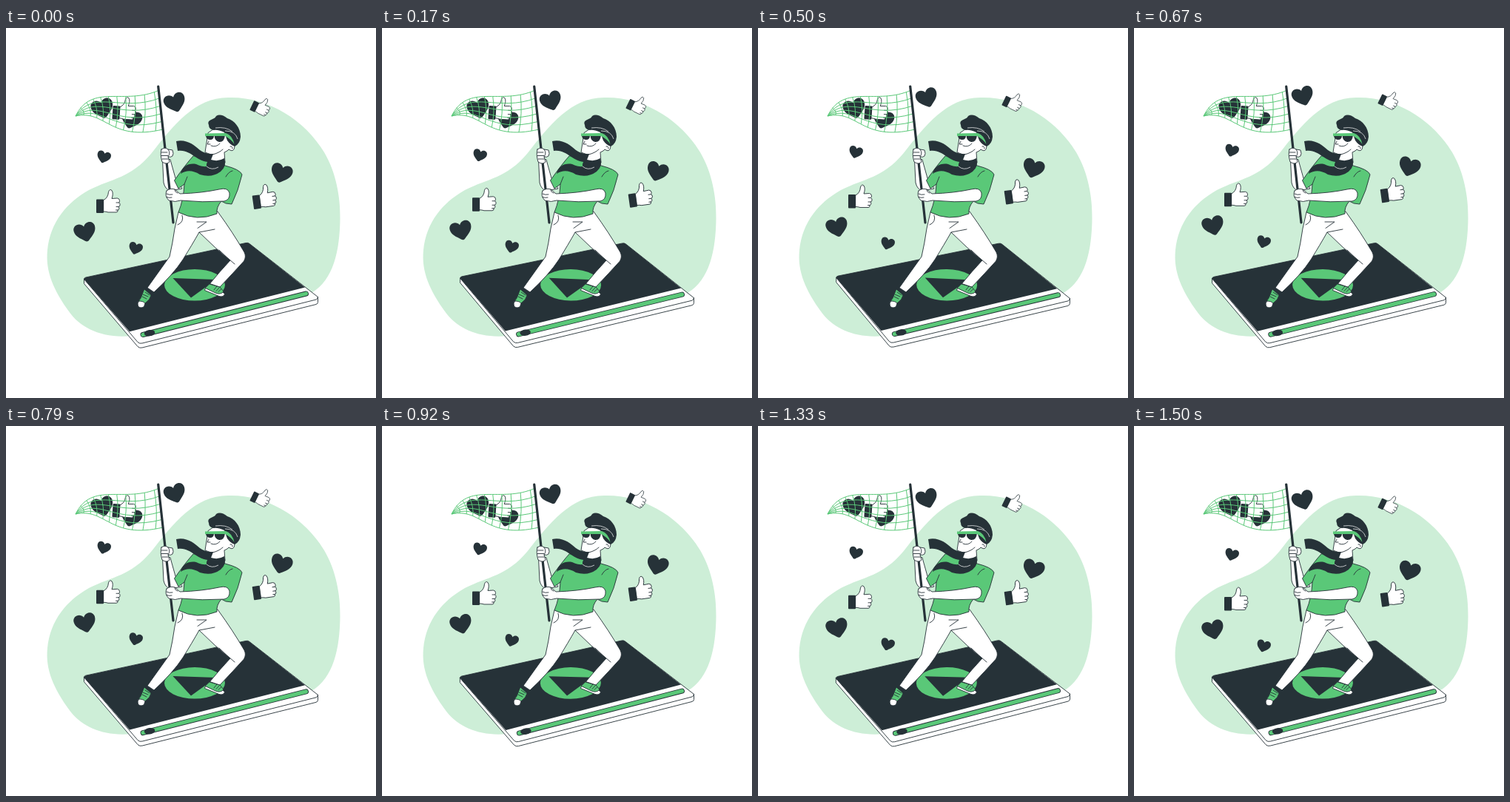
Recreate the animation shown at these times as an HTML page. Size 500 by 500 pixels, loop 1.54 s.

```html
<!DOCTYPE html>
<html lang="en">
<head>
<meta charset="utf-8">
<title>Catching likes</title>
<style>
  html, body { margin: 0; width: 100%; height: 100%; overflow: hidden; background: #fff; }
  svg { display: block; width: 100vw; height: 100vh; }
  .ink { fill: #263238; }
  .white, .green { stroke: #263238; stroke-width: .9; stroke-linejoin: round; stroke-linecap: round; }
  .white { fill: #fff; }
  .green { fill: #5ac878; }
  .line { fill: none; stroke: #263238; stroke-width: .9; stroke-linecap: round; stroke-linejoin: round; }
  .shine { fill: none; stroke: #fff; stroke-width: .7; }
  #net { fill: none; stroke: #5ac878; stroke-width: 1; }
</style>
</head>
<body>
<svg viewBox="0 0 500 500">
  <defs>
    <path id="heart" class="ink" d="M0 13Q-1.500 13-3 11.500C-8 7-15 3-15-5C-15-13.500-4-15.500 0-8C4-15.500 15-13.500 15-5C15 3 8 7 3 11.500Q1.500 13 0 13Z"/>
    <g id="thumb">
      <rect class="ink" x="-16" y="-4" width="10" height="18.500" rx="1"/>
      <path class="white" d="M-6-3Q0-6 .5-14Q2-18.500 5-16Q7.500-12 5-5L12.500-5.500Q15.500-5 15.500-2Q15.500 0 14.500 .5Q16.500 1.500 16 4Q15.500 6 14 6Q15.500 7.500 14.500 9.500Q14 10.500 13 10.500Q13.500 13.500 11 13.500L0 13.500Q-3 12.500-6 12.500Z"/>
      <path class="line" d="M11 .5H14.500M11 6H14M10.500 10.500H13"/>
    </g>
  </defs>

  <path fill="#cdeed7" d="M300 94C352 92 403 123 430 168C446 195 452 228 451.500 258C451 300 443 340 413 358L300 390L170 416C130 420 100 405 85 383C65 355 53 330 56 300C60 262 82 236 112 219C144 203 168 203 196 170C226 132 255 94 300 94Z"/>

  <g id="tablet">
    <path class="white" d="M105.500 339V345.500L178 430.500Q180.500 433 184 432L419 373.500Q421.500 372.500 421.500 370.500V363.500L329 291.500Q327 289.800 324 290.500L108 337Z"/>
    <path class="line" d="M105.500 339.500L178 424.500Q180.500 427 184 426L419 367Q421.500 366 421.500 363.500"/>
    <path class="ink" d="M105.500 339.500Q105.500 337.500 108 337L324 290.500Q327 289.800 329 291.500L404 350.500L167 410.300Z"/>
    <path class="line" style="stroke-width:7" d="M185 414.500L405.500 359"/>
    <path class="line" style="stroke:#5ac878;stroke-width:5.200" d="M185 414.500L405.500 359"/>
    <ellipse class="ink" cx="194" cy="412.200" rx="7.300" ry="4.200" transform="rotate(-8 194 412)"/>
    <ellipse fill="#5ac878" cx="255" cy="347.300" rx="41" ry="21.300"/>
    <path class="ink" d="M225.500 338L284 340L250 364.500Z"/>
  </g>

  <g id="floaters"></g>
  <g id="caught"></g>
  <path id="net"/>

  <g id="catcher">
    <!-- shoes and trousers -->
    <path class="green" d="M187 353L196 361Q195 367 188 372L186.500 376Q181 379 178 375Q178 369 182 365Z"/>
    <path class="white" d="M179.500 369Q186 369 188 372L186.500 376.500Q182 379.500 178.500 376Q177 372 179.500 369Z"/>
    <path class="line" d="M185 360L192 363M184 363L190 366M188 357L194 361"/>
    <path class="white" d="M270 350L268.500 354.500L288 362.500Q294 364 295.500 359.500L291 355Z"/>
    <path class="green" d="M275 346L289 350L294 356Q290 361 283 358L269.500 351.500Z"/>
    <path class="line" d="M281 354L285 349M284 355.500L288 351M287 356.500L290.500 353"/>
    <path class="white" d="M233 249L228 271Q225 292 221 309L191 351L200 357Q226 333 239 313Q252 292 261 276Q283 298 303 314Q289 329 275.500 345.500L289 350Q307 331 321.500 315Q325 309 322 303Q307 277 286 248Z"/>
    <path class="line" d="M288 300Q298 310 309 319M258 262H271L259 270.500M261 276L282 272M238 253Q241 262 232 266"/>

    <!-- far arm and shirt -->
    <path class="white" d="M211.500 178L213 209Q215 218 222 220L238 217L229 203L222 178Z"/>
    <path class="green" d="M253 173Q243 184 227.500 206L233 217L241 211Q240 232 233 249Q258 262 285 251Q284 242 291 234L297 237L305 238Q314 220 319 198Q316 191 296 186L288 178Z"/>
    <path class="line" d="M306 193Q301 194 297 201M241 211L245 201"/>

    <!-- head -->
    <path class="white" d="M273 142L271 155L269 168Q276 171 279 171L274 182L296 182L295 168Q300 166 301 164Q308 169 309 160L307 145L285 134Z"/>
    <path class="ink" d="M274 131C271 123 281 125 284 119Q290 115 299 122C309 125 317 135 317 147Q316 157 309 160Q303 158 299 152L295 141Q286 137 281 138Q274 137 274 131Z"/>
    <path class="shine" d="M283 135Q297 133 306 140M296 139Q310 139 313 150"/>
    <path class="ink" d="M270 145H281Q281 151.500 275 151Q270 150 270 145ZM281.500 145H296Q295 154.500 288 154Q282 153 281.500 145Z"/>
    <path fill="#5ac878" d="M269 142.500L297 142Q306 145 308.500 157Q304 150 296 146L269 146Z"/>
    <path class="line" d="M277 159Q284 162 289 156M274 153L272 157L276 157M279 171Q288 169 293 164M303 160Q306 159 306 163"/>

    <!-- scarf -->
    <path class="ink" d="M230 153C244 150 254 158 262 165Q270 171 280 170L276 181C256 181 250 163 232 166Z"/>
    <path class="ink" d="M236 197C238 186 248 182 257 184Q266 188 271 187Q270 180 277 178Q287 181 295 176Q299 186 290 194Q278 203 262 198C252 192 244 192 236 197Z"/>
    <path class="shine" d="M271 187Q278 193 287 188"/>

    <!-- pole, hands and near arm -->
    <path d="M205.700 79L226 263" stroke="#263238" stroke-width="3.200" stroke-linecap="round"/>
    <path class="white" d="M210 164Q215 160.500 219 164L225 165Q227 170 225 173Q223 175 219 174L221 181Q217 185 211 181Q208 171 210 164Z"/>
    <path class="line" d="M210 168H218M210 172.500H219M211 177H219M219 164Q223 169 219 174"/>
    <path class="white" d="M217 220Q222 216 228 218L235 224Q265 223 288 218Q300 215 302 223Q303 232 295 234Q265 236 236 233Q229 236 220 233Q214 227 217 220Z"/>
    <path class="line" d="M217 224Q220 226 225 225M217 228.500Q220 230 224 229M228 218Q228 222 232 223"/>
  </g>
</svg>
<script>
const LOOP = 1540;
const el = id => document.getElementById(id);

const icon = ([shape, x, y, turn, size]) =>
  `<use href="#${shape}" transform="translate(${x} ${y}) rotate(${turn}) scale(${size})"/>`;

el('floaters').innerHTML = [
  ['heart', 228.500, 101, -18, .97],
  ['heart', 372, 196.500, 17, .97],
  ['heart', 107, 276, -14, .98],
  ['heart', 132, 174.500, 16, .62],
  ['heart', 175, 298, 16, .62],
  ['thumb', 138, 235.500, 0, 1],
  ['thumb', 349, 228.500, -8, 1],
  ['thumb', 345, 106, 26, .76],
].map(icon).join('');

el('caught').innerHTML = [
  ['heart', 130.500, 109, -15, 1],
  ['heart', 169, 123.500, 17, .95],
  ['thumb', 160, 110, 4, .98],
].map(icon).join('');

// The net is a surface between two cubic edges that meet at its tip.
const topEdge = [[94, 119], [116, 74], [160, 105], [207, 84]];
const lowEdge = [[94, 119], [135, 110], [140, 154], [212, 137]];
const between = v => topEdge.map((p, i) => p.map((c, k) => c + (lowEdge[i][k] - c) * v));
const netPoint = (u, v) => {
  const weights = [(1 - u) ** 3, 3 * u * (1 - u) ** 2, 3 * u * u * (1 - u), u ** 3];
  return [0, 1].map(k => between(v).reduce((sum, p, i) => sum + p[k] * weights[i], 0));
};

let mesh = '';
for (let i = 0; i <= 5; i++) {
  const [a, b, c, d] = between(i / 5);
  mesh += `M${a}C${b} ${c} ${d}`;
}
for (let i = 1; i <= 10; i++) {
  const u = i / 10.5;
  const [x, y] = netPoint(u, .5);
  mesh += `M${netPoint(u, 0)}Q${x + 4} ${y} ${netPoint(u, 1)}`;
}
el('net').setAttribute('d', mesh);

const triangle = p => 1 - Math.abs(1 - 2 * (p % 1));

function draw() {
  const p = performance.now() % LOOP / LOOP;
  const lift = -10 * triangle(p);
  const tilt = 2 * triangle(p + .25) - 1;
  el('floaters').setAttribute('transform', `translate(0 ${lift})`);
  el('tablet').setAttribute('transform', `rotate(${tilt} 263.5 361)`);
  requestAnimationFrame(draw);
}
draw();
</script>
</body>
</html>
```
